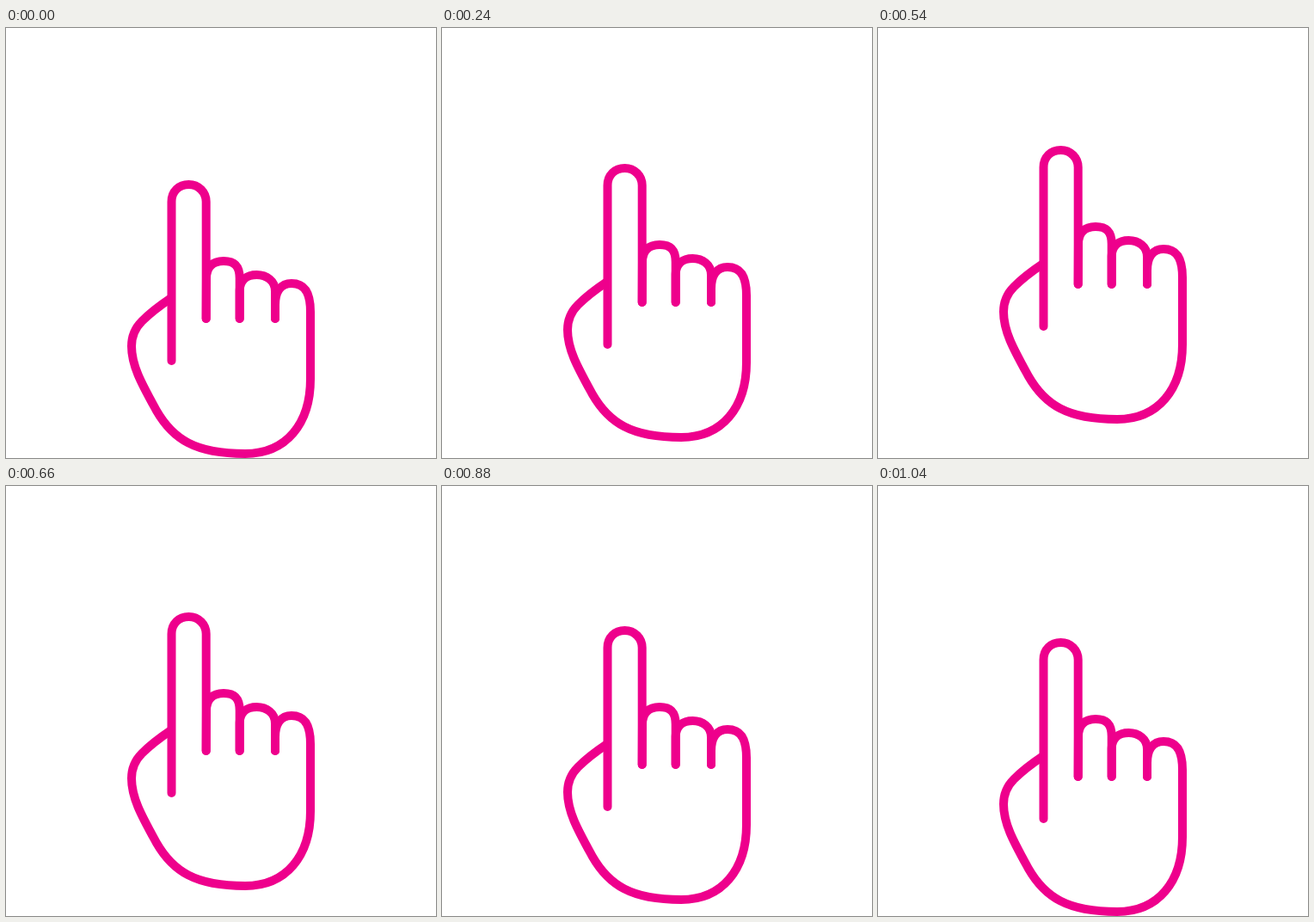
Recreate the animation shown at these times as an HTML page. Size 500 by 500 pixels, loop 1.06 s.

```html
<!DOCTYPE html>
<html lang="en">
<head>
<meta charset="utf-8">
<title>Pointing hand</title>
<style>
  html, body { margin: 0; width: 100%; height: 100%; overflow: hidden; background: #fff; }
  svg { display: block; width: 100%; height: 100%; }
  path { fill: none; stroke: #ee008c; stroke-width: 10; stroke-linecap: round; stroke-linejoin: round; }
</style>
</head>
<body>
<svg viewBox="0 0 500 500">
  <g id="hand">
    <!-- index finger -->
    <path d="M192.5 387V202C192.5 190 201 182 212.5 182C224 182 232.7 191 232.7 202V338"/>
    <!-- folded fingers -->
    <path d="M232.7 338L233 291C233 278 240 271 253 271C267 271 271.7 278 271.7 291V338"/>
    <path d="M271.7 338V305C272 293 280 287 291.5 287C303 287 313 294 313 306V338"/>
    <!-- little finger, palm and thumb -->
    <path d="M313 338V322C313 306 320 297 332 297C350 297 354 312 354 330V408C354 460 326 495 278 495C220 495 194 478 175 445C158 414 146 393 146 370C146 356 151 348 158 341C166 333 180 322 192 314"/>
  </g>
</svg>
<script>
  const hand = document.getElementById('hand');
  const LOOP = 1060, STEP = 20;
  // [time in ms, lift in px]
  const keys = [[0, 0], [520, 41], [540, 40], [660, 30], [680, 30], [880, 14], [1040, 0], [LOOP, 0]];

  function lift(t) {
    const i = keys.findIndex(([time]) => time > t);
    const [t0, y0] = keys[i - 1], [t1, y1] = keys[i];
    return Math.round(y0 + (y1 - y0) * (t - t0) / (t1 - t0));
  }

  function draw(now) {
    const t = Math.floor((now % LOOP) / STEP) * STEP;
    hand.setAttribute('transform', `translate(0 ${-lift(t)})`);
    requestAnimationFrame(() => draw(performance.now() - start));
  }

  const start = performance.now();
  draw(0);
</script>
</body>
</html>
```
